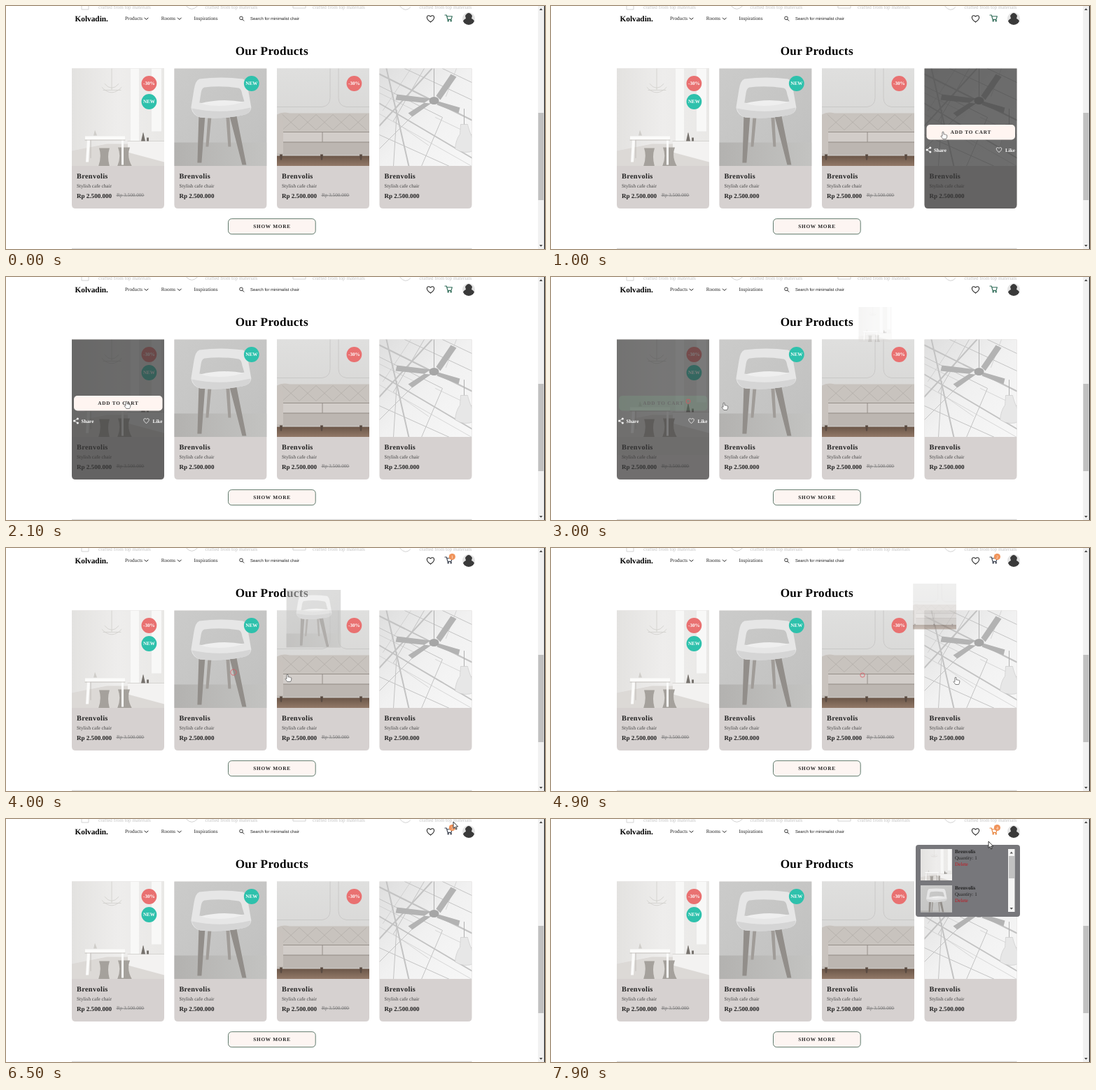
An HTML page for the animation above (8 s loop, 770 px wide and 348 px high).

```html
<!DOCTYPE html>
<html lang="en">
<head>
<meta charset="utf-8">
<title>Our Products</title>
<style>
  html, body { margin: 0; width: 100%; height: 100%; overflow: hidden; background: #fff; }
  svg { display: block; width: 100%; height: 100%; }
  text { font-family: "Liberation Serif", "Times New Roman", serif; font-size: 7.2px; fill: #222; white-space: pre; text-rendering: geometricPrecision; }
  .b { font-weight: 700; }
  .mid { text-anchor: middle; }
  .line { fill: none; stroke-linecap: round; stroke-linejoin: round; }
</style>
</head>
<body>
<svg id="stage" viewBox="0 0 770 348">
  <defs>
    <clipPath id="photo"><path d="M0 0H132V139.5H0Z"/></clipPath>
    <clipPath id="thumb"><path d="M0 0H132V132H0Z"/></clipPath>
    <clipPath id="list"><path d="M528 43H653V133.500H528Z"/></clipPath>
    <clipPath id="round"><circle cx="661" cy="18" r="9"/></clipPath>
    <linearGradient id="room"><stop offset="0" stop-color="#e3e2e0"/><stop offset=".5" stop-color="#eeedec"/><stop offset="1" stop-color="#e9e8e6"/></linearGradient>
    <linearGradient id="grey" x2="1" y2="1"><stop offset="0" stop-color="#cbcbca"/><stop offset="1" stop-color="#c0c0bf"/></linearGradient>
    <linearGradient id="floor"><stop offset="0" stop-color="#b3b2b0"/><stop offset="1" stop-color="#c3c3c1"/></linearGradient>
    <linearGradient id="wall" x2="0" y2="1"><stop offset="0" stop-color="#dfdfde"/><stop offset="1" stop-color="#d3d2d0"/></linearGradient>
    <linearGradient id="wood" x2="0" y2="1"><stop offset="0" stop-color="#6b5648"/><stop offset="1" stop-color="#937a69"/></linearGradient>
    <linearGradient id="sky" x2="1" y2="1"><stop offset="0" stop-color="#dedede"/><stop offset=".5" stop-color="#f1f1f1"/><stop offset="1" stop-color="#f7f7f7"/></linearGradient>

    <g id="img0" clip-path="url(#photo)">
      <path fill="url(#room)" d="M0 0H132V140H0Z"/>
      <path fill="#f8f8f7" d="M84 0H96V104H84ZM114 0H128V90H114Z"/>
      <path fill="#dcd9d6" d="M0 118L50 108H132V140H0Z"/>
      <path fill="#f3f2f1" d="M80 104H132V134L80 120Z"/>
      <path class="line" stroke="#d0cecb" stroke-width=".8" d="M57 0V30M43 27Q57 42 71 27M47 22Q57 34 67 22M45 31H70M80 104H132"/>
      <path fill="#77736e" d="M101 95Q102 88 103 95L105 104H99ZM107 99H110V104H107Z"/>
      <path fill="#a5a19c" d="M39 114H54Q50 126 54 140H38Q43 126 39 114ZM66 113H83Q78 126 86 140H65Q71 126 66 113Z"/>
      <path fill="#fbfbfa" d="M19 97H76V102H74V138H71V102H26L24 134H20L22 102H19Z"/>
      <path class="line" stroke="#bab7b3" stroke-width=".8" d="M19 102.500H76M27 103V128"/>
      <path fill="#cfcdc9" d="M31 96L33 88L36 96Z"/>
    </g>

    <g id="img1" clip-path="url(#photo)">
      <path fill="url(#grey)" d="M0 0H132V140H0Z"/>
      <path fill="url(#floor)" d="M0 106H132V140H0Z"/>
      <path fill="#a09c98" d="M48 70H53L49 112H45ZM74 70H79L81 112H77Z"/>
      <path fill="#928e8a" d="M35 68H44L39 135H33ZM79 68H89L103 138H97Z"/>
      <path fill="#e6e6e6" fill-rule="evenodd" d="M36 15Q67 11 98 15Q104 17 106 33L110 56Q109 65 97 67Q67 73 37 70Q26 67 24 56L28 31Q30 17 36 15ZM43 27Q67 24 92 28Q96 29 97 37L100 47Q67 55 36 49L38 36Q39 28 43 27Z"/>
      <path fill="#d5d5d5" d="M25 57Q67 66 109 56Q109 65 97 67Q67 73 37 70Q28 67 25 57Z"/>
      <path fill="#efefef" d="M37 50Q67 42 99 48Q67 58 37 50Z"/>
    </g>

    <g id="img2" clip-path="url(#photo)">
      <path fill="url(#wall)" d="M0 0H132V140H0Z"/>
      <path class="line" stroke="#c8c7c6" stroke-width=".9" d="M76 0V42Q76 53 65 55H0M88 0V42Q88 53 99 55H132"/>
      <path fill="url(#wood)" d="M0 125H132V140H0Z"/>
      <path fill="#c8c3be" d="M0 66Q8 61 18 64H132V94H0Z"/>
      <path class="line" stroke="#aca6a1" stroke-width=".6" d="M8 66l12 11l12-11l12 11l12-11l12 11l12-11l12 11l12-11l12 11l12-11M8 88l12-11l12 11l12-11l12 11l12-11l12 11l12-11l12 11l12-11l12 11"/>
      <path fill="#d2cdc9" d="M0 91H132V105H0Z"/>
      <path fill="#bcb6b1" d="M0 105H132V124H0Z"/>
      <path class="line" stroke="#8f8983" stroke-width=".9" d="M0 91H132M0 105.500H132M65 91V105"/>
      <path fill="#c9c3be" d="M0 72Q9 70 9 80V122H0Z"/>
      <path fill="#594a41" d="M4 123H8L7 131H5ZM62 123H66L65 131H63ZM118 123H122L121 131H119Z"/>
    </g>

    <g id="img3" clip-path="url(#photo)">
      <path fill="url(#sky)" d="M0 0H132V140H0Z"/>
      <g class="line" stroke="#c3c3c3">
        <path stroke-width="2" d="M0 8L132 74M0 50L132 128M10 0L42 140M0 82L75 0"/>
        <path stroke-width="1" d="M36 0L132 45M0 25L90 70L60 140M64 0L20 75M0 115L60 55M90 0L132 20M0 95L100 140M25 60L20 140"/>
        <path stroke-width=".6" d="M0 65L132 140M45 0L5 60M80 70L132 95M0 35L50 60M70 110L20 75M110 0L95 40"/>
      </g>
      <path fill="#b3b3b3" d="M74 43L25 37L23 45L72 50ZM81 39L102 8L110 12L87 45ZM84 47L115 56L113 64L82 52ZM75 49L47 69L41 64L72 44Z"/>
      <ellipse cx="78" cy="46" rx="7" ry="5.500" fill="#a6a6a6"/>
      <path class="line" stroke="#b0b0b0" d="M78 40V0M121 80V58"/>
      <path fill="#e7e7e7" stroke="#c6c6c6" stroke-width=".6" d="M116 80H126Q128 90 136 106V117Q122 124 108 115Q109 102 115 94Z"/>
    </g>

    <path id="heart" d="M0 4.800C-9 -1 -4.500 -7.500 0 -3.300C4.500 -7.500 9 -1 0 4.800Z"/>
    <path id="card" d="M0 0H132V195Q132 200.500 126.500 200.500H5.500Q0 200.500 0 195Z"/>
  </defs>
</svg>
<script>
const LOOP = 8000, STEP = 100, FLIGHT = 1100;
const NAME = "Brenvolis", BRAND = "Kolvadin.";
const CARD_X = [94, 240.4, 387, 533.5], CARD_Y = 89.5;
const BADGES = [["-30%", "NEW"], ["NEW"], ["-30%"], []];

// [card, fade-in start, fade-out start, fade-out length]
const HOVERS = [
  [3, 350, 1250, 250], [2, 1150, 1650, 200], [1, 1650, 1850, 200], [0, 1850, 2980, 220],
  [1, 3120, 3750, 200], [2, 4020, 4600, 220], [3, 4920, 5600, 200]
];
// [card, time, x, y]
const CLICKS = [[0, 2590, 196, 178], [1, 3725, 325, 178], [2, 4560, 445, 182], [3, 5450, 579, 184]];
// [time, x, y] of the pointer tip
const PATH = [
  [100, 592, 262], [200, 570, 260], [350, 570, 260], [600, 575, 186], [1000, 560, 180], [1300, 470, 179],
  [1600, 334, 178], [1900, 205, 178], [2100, 172, 178], [2400, 172, 178], [2600, 196, 178], [2800, 200, 178],
  [3000, 247, 180], [3300, 318, 178], [3800, 326, 178], [4000, 402, 181], [4300, 440, 181], [4650, 446, 182],
  [4900, 578, 185], [5500, 579, 184], [5700, 584, 150], [6000, 600, 80], [6500, 639, 4], [6700, 639, 4],
  [6900, 634, 13], [7600, 634, 15], [7900, 625, 32]
];

const stage = document.getElementById("stage");
const clamp = v => Math.max(0, Math.min(1, v));
const text = (x, y, s, size = 7.2, cls = "", extra = "") =>
  `<text x="${x}" y="${y}" class="${cls}" style="font-size:${size}px;${extra}">${s}</text>`;
const line = (d, color, w = 1) => `<path class="line" d="${d}" stroke="${color}" stroke-width="${w}"/>`;
const rect = (x, y, w, h, fill, r = 0, extra = "") =>
  `<rect x="${x}" y="${y}" width="${w}" height="${h}" rx="${r}" fill="${fill}" ${extra}/>`;
const heart = (x, y, color, scale) =>
  `<use href="#heart" transform="translate(${x} ${y}) scale(${scale})" fill="none" stroke="${color}" stroke-width="1.1"/>`;

// CSS "ease" curve, solved by bisection
function ease(x) {
  let lo = 0, hi = 1;
  for (let i = 0; i < 24; i++) {
    const m = (lo + hi) / 2, n = 1 - m;
    if (.75 * n * m + m ** 3 < x) lo = m; else hi = m;
  }
  const n = 1 - lo;
  return .3 * n * n * lo + 3 * n * lo * lo + lo ** 3;
}

function header() {
  let s = "";
  [132, 284.5, 438, 590.5].forEach((x, i) => {
    s += text(x, 3.6, "crafted from top materials", 7.2, "", "fill:#c4c4c4");
    s += line([`M${x - 24} 0V5H${x - 14}V0`, `M${x - 27} 0Q${x - 19} 9 ${x - 11} 0`,
      `M${x - 28} 0V3H${x - 10}V0`, `M${x - 28} 0Q${x - 20} 10 ${x - 13} 2`][i], "#d3d3d3");
  });
  s += text(98.5, 21.6, BRAND, 11.3, "b", "fill:#000");
  s += text(170, 20.3, "Products") + text(221.7, 20.3, "Rooms") + text(268.5, 20.3, "Inspirations");
  s += line("M198 17l2.500 2.500l2.500 -2.500M245.300 17l2.500 2.500l2.500 -2.500", "#222");
  s += `<circle cx="336" cy="17.300" r="2.300" fill="none" stroke="#222" stroke-width=".9"/>` + line("M337.800 19.200l2 2", "#222");
  s += text(349, 20, "Search for minimalist chair", 5.95, "", "font-family:'Liberation Sans',Arial,sans-serif");
  s += heart(606.5, 18.3, "#222", .98);
  s += `<g clip-path="url(#round)">${rect(650, 8, 22, 22, "#e4e4e4")}
    <path fill="#3a3a3a" d="M656 14Q661 6 666 14L665 18Q670 20 671 28H651Q652 20 657 18Z"/></g>`;
  return s;
}

function cards() {
  return CARD_X.map((x, i) => {
    let s = `<use href="#card" fill="#d6d1d0"/><use href="#img${i}"/>`;
    BADGES[i].forEach((b, k) => {
      const y = 21.5 + 26 * k;
      s += `<circle cx="110.400" cy="${y}" r="10.900" fill="${b === "NEW" ? "#2ec1ac" : "#e97171"}"/>`;
      s += text(110.4, y + 2.3, b, 7.1, "b mid", "fill:#fff");
    });
    s += text(7, 157, NAME, 10.3, "b", "letter-spacing:.35px");
    s += text(7, 170.3, "Stylish cafe chair", 7.2, "", "fill:#444");
    s += text(7, 185, "Rp 2.500.000", 9.05, "b");
    if (i % 2 === 0) s += text(64, 183.9, "Rp 3.500.000", 7.2, "", "fill:#777") + line("M63.700 181.800H103.200", "#777", .7);
    s += `<g id="over${i}" opacity="0"><use href="#card" fill="#3a3a3a" fill-opacity=".72"/>
      <g id="btn${i}">${rect(3, 80.5, 126.5, 21.5, "#fff5f1", 5)}${text(66.4, 93.6, "ADD TO CART", 7.2, "b mid", "letter-spacing:.8px")}</g>
      <g fill="#fff"><circle cx="8.300" cy="113.500" r="1.500"/><circle cx="8.300" cy="119.500" r="1.500"/><circle cx="3.600" cy="116.500" r="1.500"/></g>
      ${line("M8.300 113.500L3.600 116.500L8.300 119.500", "#fff", .8)}
      ${text(13.5, 119, "Share", 7.2, "b", "fill:#fff")}${heart(106.5, 116.5, "#fff", .72)}
      ${text(129.5, 119, "Like", 7.2, "b", "fill:#fff;text-anchor:end")}</g>`;
    return `<g transform="translate(${x} ${CARD_Y})">${s}</g>`;
  }).join("");
}

function panel() {
  let s = rect(521, 37, 149, 103, "#77777b", 4) + `<g clip-path="url(#list)">`;
  for (let i = 0; i < 3; i++) {
    const y = 43 + 52 * i;
    s += `<g transform="translate(528 ${y}) scale(.341)" clip-path="url(#thumb)"><use href="#img${i}"/></g>`;
    s += text(577, y + 6, NAME, 7.3, "b") + text(577, y + 15, "Quantity: 1", 7) + text(577, y + 24, "Delete", 7.2, "", "fill:#c4161f");
  }
  s += "</g>" + rect(653, 43, 9.5, 90, "#f4f4f4") + rect(654, 53, 8, 32, "#c1c1c1");
  return s + `<path fill="#555" d="M655.500 49.500h4.500l-2.250 -2.800zM655.500 127h4.500l-2.250 2.800z"/>`;
}

const CART = "M627 13h2.300l1.700 6.300h5l1.300 -4.500h-7.500";
stage.innerHTML += `${rect(0, 0, 770, 348, "#fff")}
  ${text(379.8, 70.3, "Our Products", 17.2, "b mid", "fill:#000;letter-spacing:.35px")}${cards()}
  ${rect(317.5, 304.7, 124.7, 22, "#fdf5f2", 5, 'stroke="#4d6b5d" stroke-width=".9"')}
  ${text(380, 317.8, "SHOW MORE", 7.3, "b mid", "letter-spacing:.72px")}
  ${rect(94, 346.8, 571.5, 1.2, "#d8d8d8")}${header()}
  <g id="cart" fill="none" stroke-width="1.150" class="line"><path d="${CART}"/><circle cx="631.700" cy="21.300" r=".7"/><circle cx="635.700" cy="21.300" r=".7"/></g>
  <g id="badge"><circle cx="637.400" cy="12.500" r="4.600" fill="#f0935a"/><text id="count" x="637.400" y="14.600" class="mid" style="font-size:6px;fill:#fff"></text></g>
  ${CLICKS.map((c, i) => `<use id="fly${i}" href="#img${c[0]}"/><circle id="ring${i}" cx="${c[2]}" cy="${c[3]}" fill="none" stroke="#e0525c"/>`).join("")}
  <g id="panel">${panel()}</g>
  ${rect(760, 0, 8.5, 348, "#f1f1f1")}${rect(760.3, 153, 7.7, 125, "#c1c1c1")}${rect(768.8, 0, 1.2, 348, "#1c1c1c")}
  <path fill="#444" d="M762 6h4.500l-2.250 -2.800zM762 342h4.500l-2.250 2.800z"/>
  <g id="pointer" stroke-linejoin="round">
    <path id="hand" transform="scale(.85)" fill="#fff" stroke="#444" stroke-width=".8" d="M-1.200 .8Q0 -.8 1.200 .8V4.500Q2.400 3.700 3.200 4.900Q4.500 4.200 5.200 5.500Q6.800 5 6.900 6.800Q7 10 5.200 12.300H-.2Q-1.800 10 -3.500 7.800Q-3 6 -1.200 7.500Z"/>
    <path id="arrow" fill="#fff" stroke="#222" stroke-width=".9" d="M0 0V9.500L2.200 7.500L3.700 11L5.200 10.300L3.700 7H6.700Z"/>
  </g>`;

const el = {};
stage.querySelectorAll("[id]").forEach(e => el[e.id] = e);
const set = (id, attrs) => { for (const k in attrs) el[id].setAttribute(k, attrs[k]); };

function pointerAt(t) {
  let i = 0;
  while (i < PATH.length - 2 && PATH[i + 1][0] <= t) i++;
  const [t0, x0, y0] = PATH[i], [t1, x1, y1] = PATH[i + 1], k = clamp((t - t0) / (t1 - t0));
  return [x0 + (x1 - x0) * k, y0 + (y1 - y0) * k];
}

function draw(t) {
  const over = [0, 0, 0, 0];
  for (const [i, a, b, len] of HOVERS)
    over[i] = Math.max(over[i], Math.min(clamp((t - a) / 200), 1 - clamp((t - b) / len)));
  over.forEach((v, i) => set("over" + i, { opacity: v }));

  let count = 0;
  CLICKS.forEach(([i, at, cx, cy], k) => {
    const age = t - at, flying = age >= 0 && age < FLIGHT, p = ease(clamp(age / FLIGHT));
    const x = CARD_X[i] + 66, y = 159.3, size = 1 - p;
    set("fly" + k, {
      opacity: flying ? 1 - p : 0,
      transform: `translate(${x + (632 - x) * p - 66 * size} ${y + (17 - y) * p - 69.75 * size}) scale(${size})`
    });
    set("ring" + k, { opacity: age >= 0 && age < 500 ? .75 : 0, r: 7 - 4 * clamp((age - 100) / 250) });
    const pressed = age >= 0 && age < 900;
    set("btn" + i, { opacity: pressed ? 1 - .8 * clamp(age / 350) : 1 });
    el["btn" + i].firstChild.setAttribute("fill", pressed ? "#6fae84" : "#fff5f1");
    if (age >= FLIGHT) count++;
  });
  // the badge counts the item as soon as it is added once the first has landed
  set("badge", { opacity: count ? 1 : 0 });
  el.count.textContent = count || "";
  set("cart", { stroke: t >= 6800 ? "#e8833a" : count ? "#3c4350" : "#2f6b57" });
  set("panel", { opacity: clamp((t - 6750) / 300) });

  const [x, y] = pointerAt(t), inCard = y > CARD_Y;
  set("pointer", { opacity: t < 100 ? 0 : 1, transform: `translate(${x} ${y})` });
  set("hand", { opacity: inCard ? 1 : 0 });
  set("arrow", { opacity: inCard ? 0 : 1 });
}

const start = performance.now();
function tick() {
  const t = (performance.now() - start) % LOOP;
  draw(Math.floor(t / STEP) * STEP);
  requestAnimationFrame(tick);
}
tick();
</script>
</body>
</html>
```
